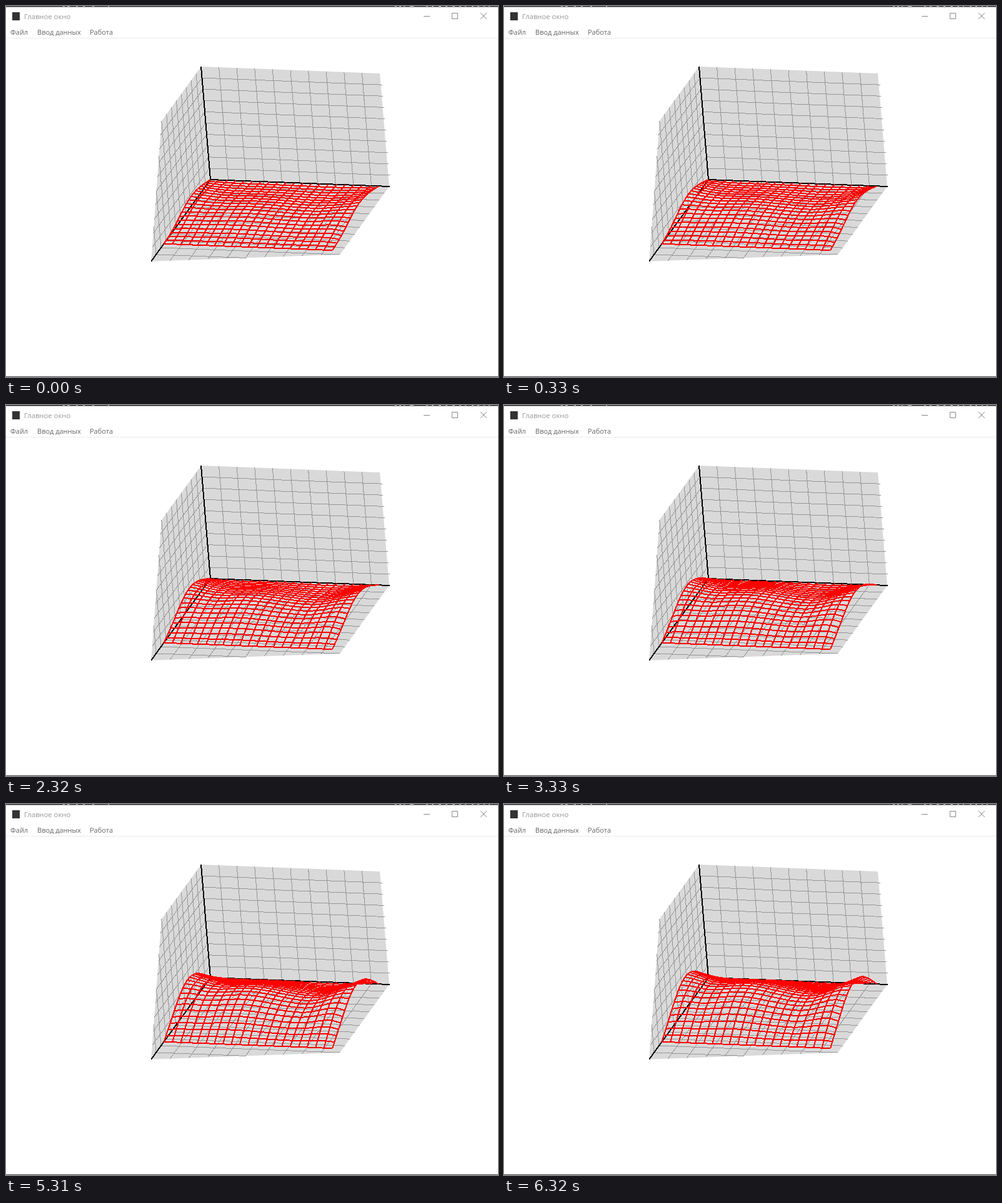
An HTML page for the animation above (7310 ms loop, 787 by 594 pixels).

```html
<!DOCTYPE html>
<html lang="ru">
<head>
<meta charset="utf-8">
<style>
html, body { margin: 0; width: 100%; height: 100%; overflow: hidden; background: #fff; }
svg { display: block; width: 787px; height: 594px; }
text { font-family: "Open Sans", "Noto Sans", sans-serif; }
path { fill: none; }
</style>
</head>
<body>
<svg viewBox="0 0 787 594">
  <rect width="787" height="594" fill="#fff"/>
  <rect width="787" height="1.6" fill="#333"/>
  <path d="M91 .5h3m4 0h4m10 0h3m8 0h3m12 0h3m22 0h2M622 .5h3m4 0h3m4 0h2m8 0h6m20 0h3m6 0h3m8 0h4m7 0h3m8 0h4m7 0h3m6 0h2m9 0h3m6 0h3m7 0h2m6 0h2" stroke="#ccc"/>
  <rect x="10" y="10" width="12" height="13" fill="#333"/>
  <text x="29" y="21" font-size="11.3" fill="#999">Главное окно</text>
  <g font-size="11" fill="#666">
    <text x="7" y="46">Файл</text>
    <text x="50" y="46">Ввод данных</text>
    <text x="134" y="46">Работа</text>
  </g>
  <path d="M668 16.5h10M713.500 11.500h9v9h-9zM759 11l10 10M769 11l-10 10" stroke="#888"/>
  <path d="M0 51.500h787" stroke="#ececec"/>
  <path d="M0 593.500h787" stroke="#444"/>
  <path id="walls" style="fill:#d9d9d9"/>
  <g shape-rendering="crispEdges">
    <path id="grid" stroke="#969696"/>
    <path id="axes" stroke="#000" stroke-width="2"/>
    <path id="mesh" stroke="#f00" stroke-width="2" stroke-linejoin="round"/>
  </g>
</svg>
<script>
const LOOP = 7310;
const STEPS = [330, 1320, 2320, 3330, 4320, 5310, 6320];
const SIZE = 3 * Math.PI;
const CELLS = 20;
const KNOTS = [[0, 1], [1.7, 0.83], [3.5, 0.92], [7, 0.63], [SIZE, 1.05]];

const $ = id => document.getElementById(id);

// Parallel projection of the box.
const project = (x, y, z) =>
  (327 + 28.6 * x - 7.9 * y - 1.5 * z).toFixed(1) + ' ' +
  (278 + 1.1 * x + 10.9 * y - 18.1 * z).toFixed(1);

const line = points => 'M' + points.map(p => project(...p)).join('L');

// The near plane cuts the box here.
const near = (x, z) => 12 - 0.2 * x - 0.4 * z;

function drawBox() {
  $('walls').setAttribute('d', [
    [[0, 0, 0], [10, 0, 0], [10, 0, 10], [0, 0, 10]],
    [[0, 0, 0], [10, 0, 0], [10, 10, 0], [0, 12, 0]],
    [[0, 0, 0], [0, 0, 10], [0, near(0, 10), 10], [0, 12, 0]]
  ].map(face => line(face) + 'Z').join(''));

  let d = '';
  for (let i = 1; i < 10; i++) {
    d += line([[i, 0, 0], [i, 0, 10]]);
    d += line([[0, 0, i], [10.08, 0, i]]);
    d += line([[i, 0, 0], [i, near(i, 0), 0]]);
    d += line([[0, 0, i], [0, near(0, i), i]]);
  }
  for (let y = 1; y < 12; y++) {
    d += line([[0, y, 0], [Math.min(10, (12 - y) / 0.2), y, 0]]);
    d += line([[0, y, 0], [0, y, Math.min(10, (12 - y) / 0.4)]]);
  }
  $('grid').setAttribute('d', d);
  $('axes').setAttribute('d',
    line([[10.04, 0, 0], [0, 0, 0], [0, 0, 10]]) + line([[0, 0, 0], [0, 12, 0]]));
}

function ripple(x) {
  let i = 0;
  while (i < KNOTS.length - 2 && x > KNOTS[i + 1][0]) i++;
  const [x0, v0] = KNOTS[i], [x1, v1] = KNOTS[i + 1];
  const u = Math.min(1, (x - x0) / (x1 - x0));
  return v0 + (v1 - v0) * u * u * (3 - 2 * u);
}

// Three sine modes across y; the second one changes sign near the side edges.
function height(x, y, k) {
  const c = Math.cos(y / 3);
  const edge = Math.exp(-x / 0.9) + Math.exp((x - SIZE) / 0.5);
  const inner = -0.1 - 0.05 * k;
  const skew = inner + (0.4 + 0.014 * k - inner) * edge;
  const main = (0.67 + 0.25 * k + 0.002 * k * k) * ripple(x);
  return Math.sin(y / 3) * (main + skew * c - 0.05 * (4 * c * c - 1));
}

function drawMesh(k) {
  const at = (i, j) => {
    const x = SIZE * i / CELLS, y = SIZE * j / CELLS;
    return [x, y, height(x, y, k)];
  };
  const indices = Array.from({ length: CELLS + 1 }, (_, i) => i);
  let d = '';
  for (const n of indices) {
    d += line(indices.map(j => at(n, j)));
    if (n) d += line(indices.map(i => at(i, n)));
  }
  $('mesh').setAttribute('d', d);
}

let shown = -1;
function frame() {
  const t = performance.now() % LOOP;
  const k = STEPS.filter(s => t >= s).length;
  if (k !== shown) drawMesh(shown = k);
  requestAnimationFrame(frame);
}

drawBox();
frame();
</script>
</body>
</html>
```
